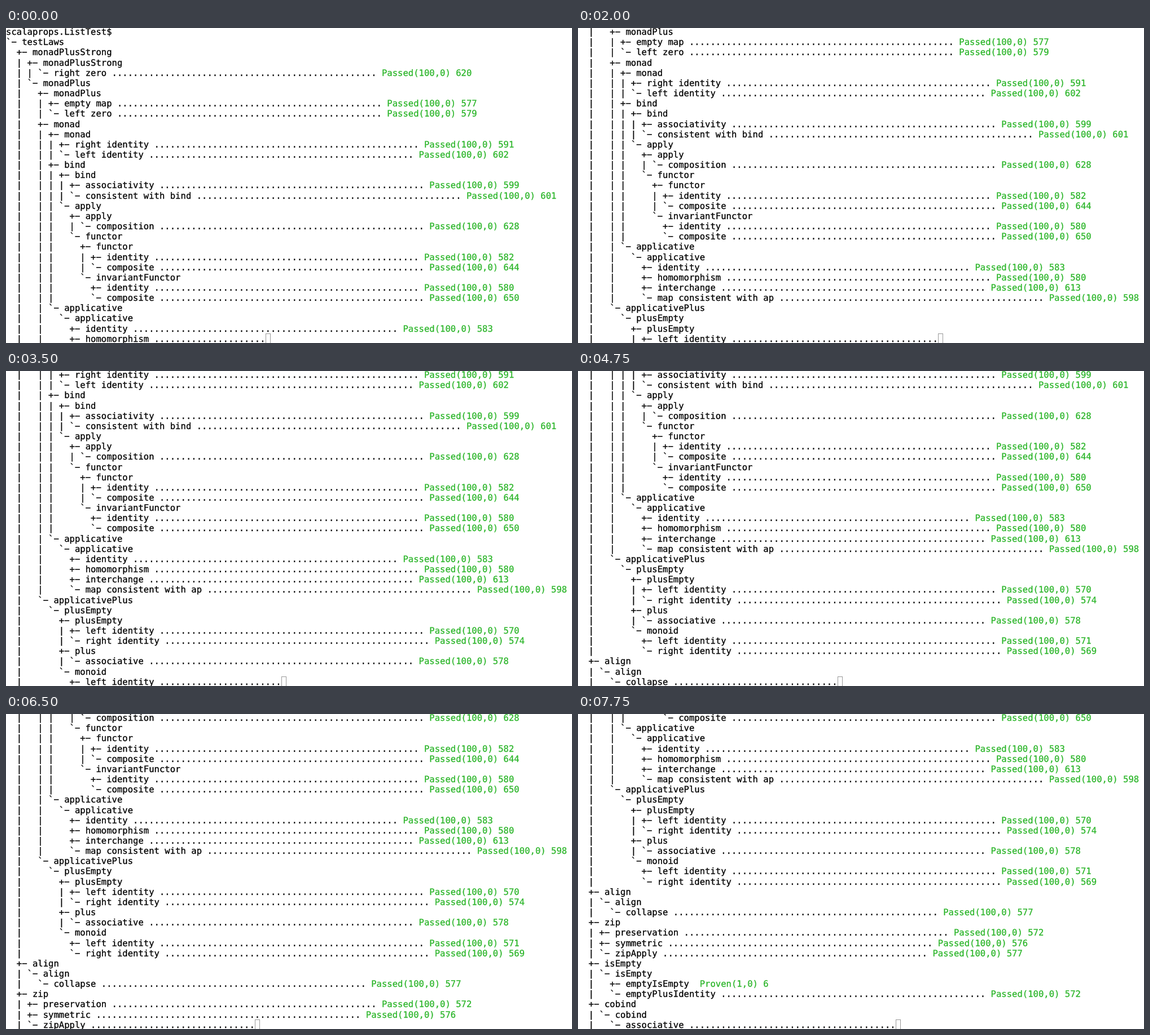
An HTML page for the animation above (8 s loop, 1003 by 559 pixels).

```html
<!DOCTYPE html>
<html>
<head>
<meta charset="utf-8">
<style>
html, body { margin: 0; width: 100%; height: 100%; overflow: hidden; background: #fff; }
#stage { position: absolute; inset: 0; overflow: hidden; contain: strict; }
#screen {
  position: absolute; left: 0; top: -1.9px; margin: 0; color: #000;
  font: 15.58px/18.15px "DejaVu Sans Mono", Menlo, monospace;
  text-rendering: geometricPrecision; font-variant-ligatures: none;
  -webkit-text-stroke: 0.3px;
}
#screen span { color: #2bb529; }
#cursor {
  position: absolute; top: 542px; bottom: 0; width: 9px;
  box-sizing: border-box; border: 1px solid #999; border-bottom: 0;
}
</style>
</head>
<body>
<div id="stage"><pre id="screen"></pre><div id="cursor"></div></div>
<!-- label ~result @start time in ms -->
<script type="text/plain" id="log">
scalaprops.ListTest$
`- testLaws
  +- monadPlusStrong
  | +- monadPlusStrong
  | | `- right zero~620
  | `- monadPlus
  |   +- monadPlus
  |   | +- empty map~577
  |   | `- left zero~579
  |   +- monad
  |   | +- monad
  |   | | +- right identity~591
  |   | | `- left identity~602
  |   | +- bind
  |   | | +- bind
  |   | | | +- associativity~599
  |   | | | `- consistent with bind~601
  |   | | `- apply
  |   | |   +- apply
  |   | |   | `- composition~628
  |   | |   `- functor
  |   | |     +- functor
  |   | |     | +- identity~582
  |   | |     | `- composite~644
  |   | |     `- invariantFunctor
  |   | |       +- identity~580
  |   | |       `- composite~650
  |   | `- applicative
  |   |   `- applicative
  |   |     +- identity~583
  |   |     +- homomorphism~580@-247
  |   |     +- interchange~613@332
  |   |     `- map consistent with ap~598@946
  |   `- applicativePlus
  |     `- plusEmpty
  |       +- plusEmpty
  |       | +- left identity~570@1549
  |       | `- right identity~574@2114
  |       +- plus
  |       | `- associative~578@2670
  |       `- monoid
  |         +- left identity~571@3230
  |         `- right identity~569@3812
  +- align
  | `- align
  |   `- collapse~577@4388
  +- zip
  | +- preservation~572@4970
  | +- symmetric~576@5550
  | `- zipApply~577@6136
  +- isEmpty
  | `- isEmpty
  |   +- emptyIsEmpty~6@6714
  |   `- emptyPlusIdentity~572@6720
  +- cobind
  | `- cobind
  |   `- associative~590@7283
</script>
<script>
const LOOP = 8000, STEP = 250, ROWS = 31, DOTS = 50, END = 7880, CELL = 9.385;
const view = document.getElementById('screen');
const cursor = document.getElementById('cursor');

const lines = document.getElementById('log').textContent.trim().split('\n').map(s => {
  const [, label, result, start] = s.match(/^(.*?)(?:~(\d+))?(?:@(-?\d+))?$/);
  return { label: label.replace(/([+`])-/, '$1\u2212'), result, start: start && +start };
});
const tests = lines.filter(l => l.start !== undefined);

const green = s => `<span>${s}</span>`;

function finished({ label, result }) {
  if (!result) return label;
  return result < 10
    ? `${label}  ${green(`Proven(1,0) ${result}`)}`
    : `${label} ${'.'.repeat(DOTS)} ${green(`Passed(100,0) ${result}`)}`;
}

function draw(t) {
  const n = tests.filter(l => l.start <= t).length - 1;
  const test = tests[n];
  const end = n + 1 < tests.length ? tests[n + 1].start : END;
  const dots = Math.floor(DOTS * (t - test.start) / (end - test.start));
  const last = lines.indexOf(test);
  const typed = test.label + ' ' + '.'.repeat(dots);
  view.innerHTML = [...lines.slice(last - ROWS + 1, last).map(finished), typed].join('\n');
  cursor.style.left = Math.round(typed.length * CELL) + 'px';
}

let shown = -1;
function tick() {
  const t = Math.floor(performance.now() % LOOP / STEP) * STEP;
  if (t !== shown) draw(shown = t);
  requestAnimationFrame(tick);
}
tick();
</script>
</body>
</html>
```
